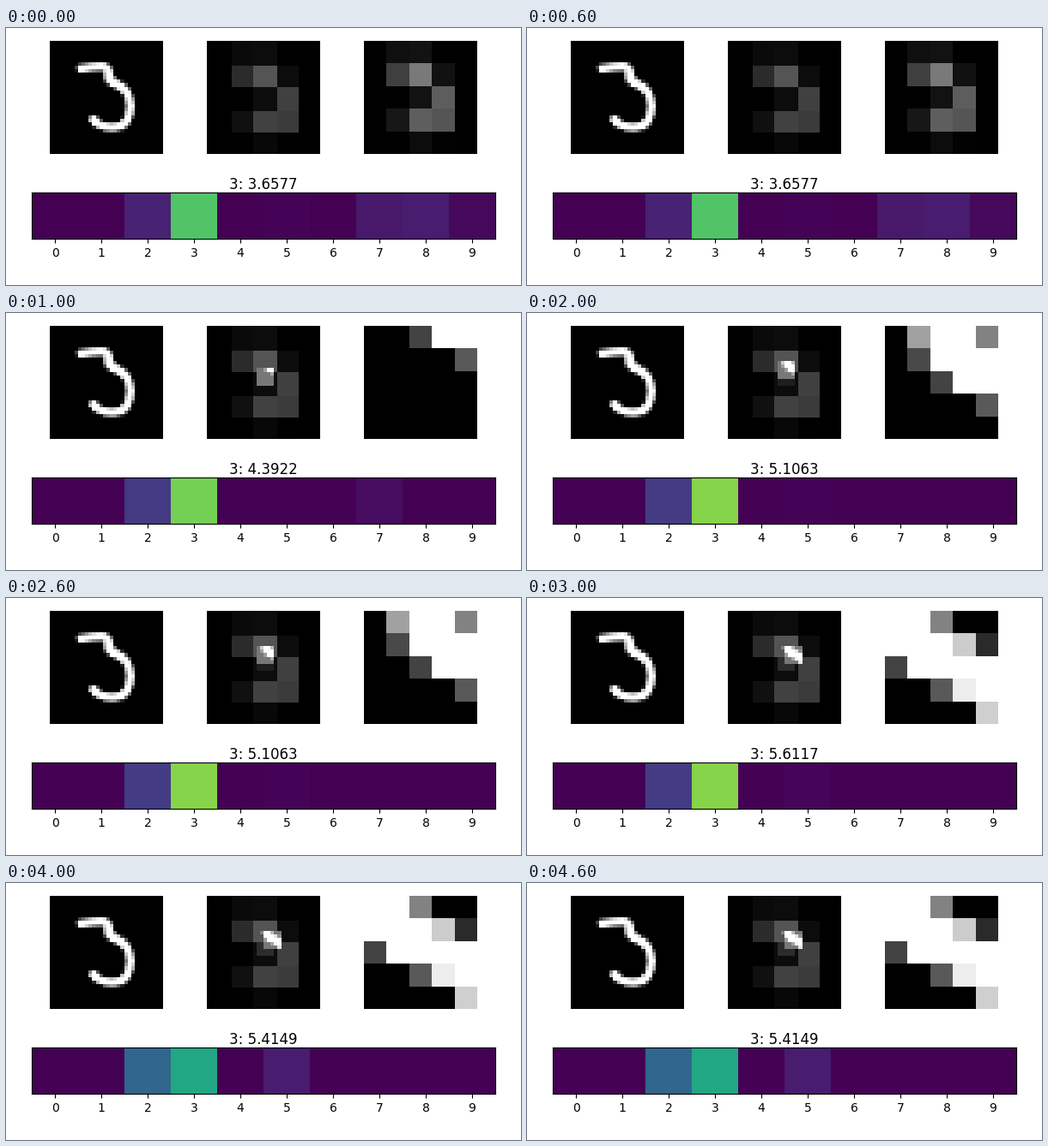
A matplotlib script for the animation above (5 s loop, 600 by 300 pixels).

```python
import numpy as np
import matplotlib.pyplot as plt
from matplotlib.animation import FuncAnimation

SIZE = 32   # side of the digit image
CELLS = 5   # side of a glimpse

# Pen path of the handwritten digit, (x, y) in image cells
PATH = [(8.8, 7.8), (12, 7.4), (15, 7.2), (16.3, 7.8), (16.7, 9.2), (17, 10.8),
        (17.9, 11.7), (20.1, 12.9), (21.5, 14.2), (22.4, 16.2), (22.7, 18.5),
        (22.5, 20.5), (21.6, 22.7), (20.2, 24.1), (18, 24.5), (15.5, 24.3),
        (13.4, 23.4), (12.4, 22.2)]
NECK = (16.3, 10.8)   # the pen presses harder here

LOOKS = [(12, 14), (10, 14), (10, 16)]   # row, column of each close look
SCORES = [3.6577, 4.3922, 5.1063, 5.6117, 5.4149]
PROBS = [{2: .095, 3: .73, 5: .008, 7: .07, 8: .075, 9: .02},
         {2: .17, 3: .79, 7: .035},
         {2: .177, 3: .817, 5: .01},
         {2: .177, 3: .817, 5: .015},
         {2: .33, 3: .6, 5: .075}]


def draw_digit():
    y, x = np.mgrid[:SIZE, :SIZE] + 0.5
    dist = np.full((SIZE, SIZE), np.inf)
    for (x0, y0), (x1, y1) in zip(PATH, PATH[1:]):
        dx, dy = x1 - x0, y1 - y0
        t = np.clip(((x - x0) * dx + (y - y0) * dy) / (dx * dx + dy * dy), 0, 1)
        dist = np.minimum(dist, np.hypot(x - x0 - t * dx, y - y0 - t * dy))
    pen = 1.15 + 0.45 * np.exp(-((x - NECK[0])**2 + (y - NECK[1])**2) / 4)
    return 255 * np.clip(0.5 + (pen - dist) / 0.8, 0, 1)


def pool(img):
    """Average the image over a coarse grid of slightly overlapping cells."""
    spans = [slice(i * SIZE // CELLS, -(-(i + 1) * SIZE // CELLS))
             for i in range(CELLS)]
    return np.array([[img[r, c].mean() for c in spans] for r in spans])


def window(corner):
    r, c = corner
    return slice(r, r + CELLS), slice(c, c + CELLS)


def glimpse(step):
    return digit[window(LOOKS[:step][-1])] if step else coarse


def canvas(step):
    """Coarse view with the close looks on top; older ones leave a dim trace."""
    idx = np.arange(SIZE) * CELLS // SIZE
    img = 0.69 * coarse[np.ix_(idx, idx)]
    looks = LOOKS[:step]
    for corner in looks:
        area = window(corner)
        lift = 120 if corner == looks[-1] else 15 * len(looks)
        img[area] = np.maximum(img[area], lift + 0.53 * digit[area])
    return img


def prob_row(step):
    return [[PROBS[step].get(i, 0) for i in range(10)]]


digit = draw_digit()
coarse = pool(digit)

fig = plt.figure(figsize=(6, 3), dpi=100)
grid = fig.add_gridspec(2, 3, left=0.05, right=0.95, bottom=0.05, top=0.95,
                        wspace=0.05, hspace=0.05)


def gray_panel(col, img):
    ax = fig.add_subplot(grid[0, col])
    ax.axis("off")
    return ax.imshow(img, cmap="gray", vmin=0, vmax=255, interpolation="nearest")


gray_panel(0, digit)
canvas_im = gray_panel(1, canvas(0))
glimpse_im = gray_panel(2, glimpse(0))

bar = fig.add_subplot(grid[1, :])
bar_im = bar.imshow(prob_row(0), cmap="viridis", vmin=0, vmax=1,
                    interpolation="nearest")
bar.set_xticks(range(10))
bar.set_yticks([])
title = bar.set_title("", pad=1.3)


def update(step):
    canvas_im.set_data(canvas(step))
    glimpse_im.set_data(glimpse(step))
    bar_im.set_data(prob_row(step))
    title.set_text(f"3: {SCORES[step]:.4f}")
    return canvas_im, glimpse_im, bar_im, title


anim = FuncAnimation(fig, update, frames=len(SCORES), init_func=lambda: update(0),
                     interval=1000, repeat=True, repeat_delay=0)
plt.show()
```
